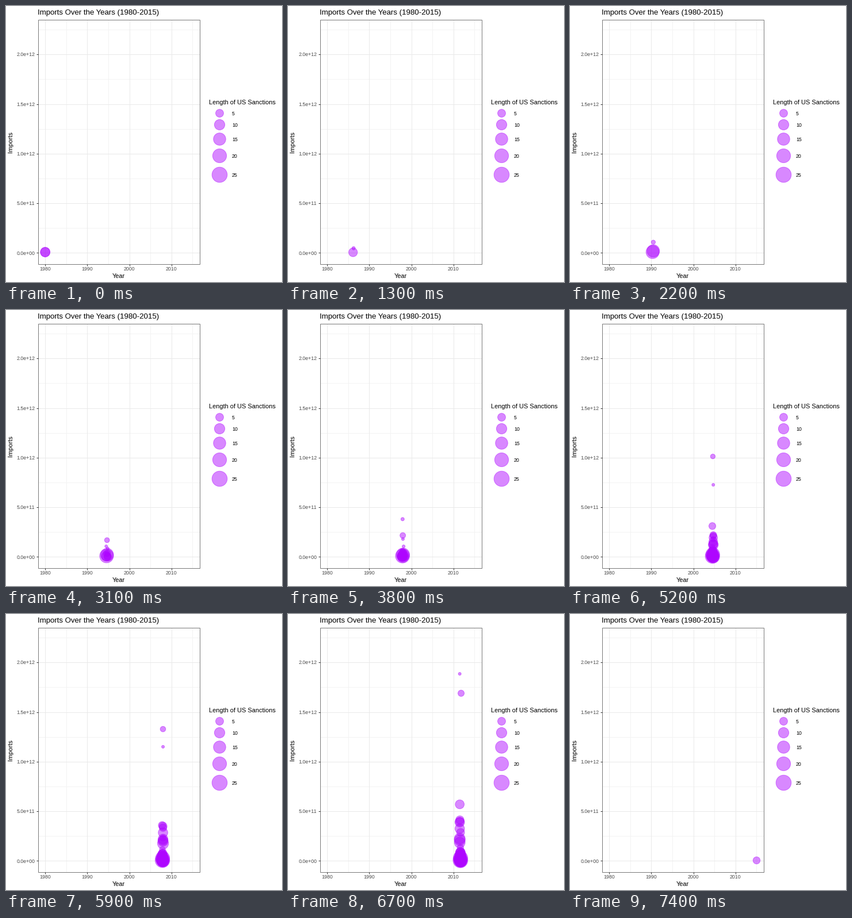
Recreate the animation shown at these times as a matplotlib script. Size 480 by 480 pixels, loop 7500 ms.

```python
import numpy as np
import matplotlib.pyplot as plt
from matplotlib.animation import FuncAnimation
from matplotlib.patches import Rectangle

plt.rcParams["font.family"] = "Liberation Sans"

FRAMES, STEP = 75, 100
SPAN, END = 35, 34.5                    # years after 1980
FILL = (0.682, 0.024, 1.0, 0.48)
LEFT, TOP, RIGHT, BOTTOM = 55.5, 23.5, 336.5, 448.5
MAJOR, MINOR, DARK, GREY = "#e9e9e9", "#f3f3f3", "#333333", "#4d4d4d"

fig = plt.figure(figsize=(480 / 72, 480 / 72), dpi=72, facecolor="white")
ax = fig.add_axes([0, 0, 1, 1])
ax.set(xlim=(0, 480), ylim=(480, 0))
ax.axis("off")


def px(year):
    return 68.2 + 7.317 * year


def py(trillions):
    return 429.4 - 172.6 * trillions


def line(x0, y0, x1, y1, color, z=1):
    ax.plot([x0, x1], [y0, y1], color=color, lw=1, zorder=z,
            solid_capstyle="butt")


def label(x, y, s, size=8.8, color="black", ha="left", **kw):
    ax.text(x, y, s, size=size, color=color, ha=ha,
            va=kw.pop("va", "baseline"), **kw)


def bubbles(x, y, r):
    return ax.scatter(x, y, s=(2 * np.asarray(r)) ** 2, facecolors=[FILL],
                      edgecolors=[FILL], linewidths=0.95, zorder=4)


# Panel grid, ticks and border
for k in range(4):
    x = px(10 * k)
    line(px(10 * k + 5), TOP, px(10 * k + 5), BOTTOM, MINOR)
    line(x, TOP, x, BOTTOM, MAJOR, 2)
    line(x, BOTTOM, x, BOTTOM + 3, DARK, 6)
    label(x, 460, str(1980 + 10 * k), color=GREY, ha="center")
for k in range(5):
    y = py(k / 2)
    line(LEFT, py(k / 2 + 0.25), RIGHT, py(k / 2 + 0.25), MINOR)
    line(LEFT, y, RIGHT, y, MAJOR, 2)
    line(LEFT - 3, y, LEFT, y, DARK, 6)
    label(50.3, y + 3.2, f"{k * 5e11:.1e}", color=GREY, ha="right")
ax.add_patch(Rectangle((LEFT, TOP), RIGHT - LEFT, BOTTOM - TOP, fill=False,
                       ec="#7a7a7a", lw=1, zorder=5))

label(55.3, 15, "Imports Over the Years (1980-2015)", 13.2)
label(196, 473, "Year", 11, ha="center")
label(13.5, 236.5, "Imports", 11, ha="right", rotation=90, va="center")

# Size legend
label(353, 171, "Length of US Sanctions", 11)
for n, y in zip(range(5, 26, 5), (186, 206, 231, 260.3, 292.8)):
    bubbles([370.5], [y], [2.5 + 2.2 * np.sqrt(n - 1)])
    label(393, y + 3.8, str(n))

# Straight moves: year, imports in trillions, radius at both ends
moves = [
    (0, .008, 8.3, 4, .008, 10.1),
    (0, .008, 8.3, 4, .008, 9.6),
    (4, .006, 6.5, 7, .006, 8.1),
    (7, .008, 11, 16, .01, 12.2),
    (16, .01, 12.2, END, .005, 13),
    (10, .02, 10.8, END, .03, 12.8),
    (12, .065, 2.6, 21, .125, 2.6),
    (21, .125, 2.6, END, .33, 8),
    (4.4, .02, 2.6, 34.8, .46, 7.8),
    (16, .2, 2.6, 34.7, 1.96, 6),
]
tracks = [[m[:3], m[3:]] for m in moves]

# Larger importers: values in three years, radius in the last two
big_years = (21, 28, 31.5, END)
for a, b, c, r, s in [(.07, .35, .57, 7, 7.8), (.075, .335, .395, 6.6, 7.5),
                      (.09, .285, .39, 8.3, 8.4), (.08, .22, .325, 8.5, 8.3),
                      (.05, .2, .21, 9, 9.5), (.06, .175, .185, 9.6, 9.4),
                      (.03, .205, .225, 8, 9.4)]:
    tracks.append(list(zip(big_years, (a, b, c, c), (r - 2, r, s, s + .4))))

# Fastest climber
tracks.append([(y, v, 2.5) for y, v in [(12, .08), (14.5, .107), (21, .242),
                                        (28, 1.15), (31.5, 1.885),
                                        (34, 2.255), (END, 2.12)]])

# Dense group of small importers, joining over time
rng = np.random.default_rng(7)
for start in np.linspace(11, 30, 30).round():
    v = 0.15 * rng.random() ** 2
    r = 12 - 28 * v - 2.5 * rng.random()
    r0 = r - max(1.5, (19 - start) * 0.6)
    tracks.append([(start, 0.35 * v, r0), (END, v, r)])

# Alone in the last year
tracks.append([(SPAN, .011, 6.2)])


def to_frame(year):
    return np.round(np.asarray(year) * (FRAMES - 1) / SPAN)


paths = [(to_frame([k[0] for k in t]), np.array(t).T) for t in tracks]
dots = bubbles([], [], [])


def update(i):
    live = np.array([[np.interp(i, at, row) for row in keys]
                     for at, keys in paths if at[0] <= i <= at[-1]
                     and (i < FRAMES - 1 or len(at) == 1)])
    year, value, radius = live.T
    dots.set_offsets(np.column_stack([px(year), py(value)]))
    dots.set_sizes((2 * radius) ** 2)
    return [dots]


anim = FuncAnimation(fig, update, frames=FRAMES, interval=STEP,
                     repeat=True, repeat_delay=0)
plt.show()
```
